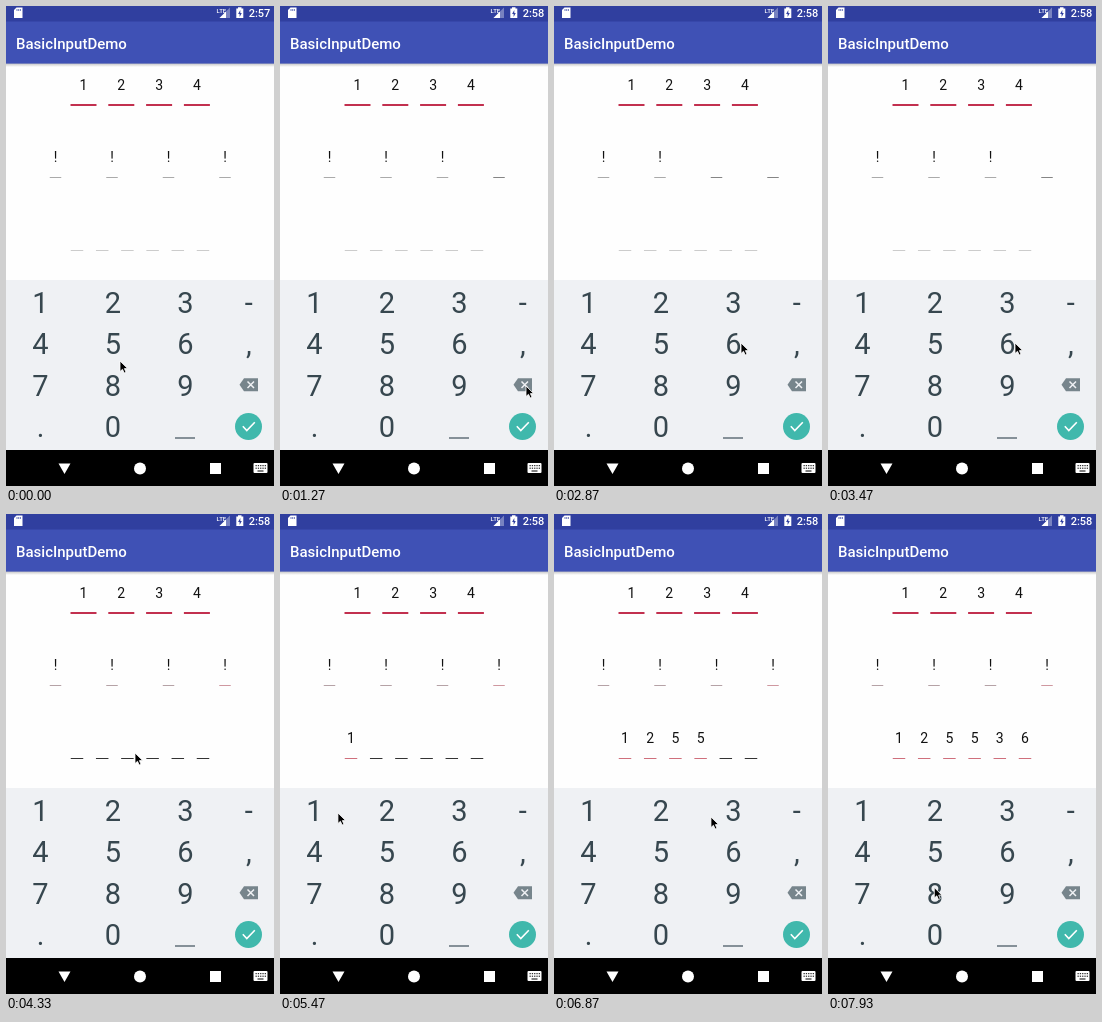
An HTML page that plays this animation: 268 px wide and 480 px high, repeating every 8 s.

```html
<!DOCTYPE html>
<html lang="en">
<head>
<meta charset="utf-8">
<title>PIN entry demo</title>
<style>
html, body { margin: 0; width: 100%; height: 100%; overflow: hidden; background: #fefefe; }
svg { display: block; }
text { font-family: Roboto, sans-serif; }
.entry text { font-size: 14px; text-anchor: middle; fill: #111; }
#keys text { font-size: 29px; text-anchor: middle; fill: #37474f; }
</style>
</head>
<body>
<svg width="268" height="480" viewBox="0 0 268 480">
  <defs>
    <linearGradient id="shade" x2="0" y2="1">
      <stop stop-color="#000" stop-opacity=".25"/>
      <stop offset="1" stop-color="#000" stop-opacity="0"/>
    </linearGradient>
  </defs>
  <rect width="268" height="480" fill="#fefefe"/>
  <rect y="57" width="268" height="4" fill="url(#shade)"/>
  <rect width="268" height="57.600" fill="#3f51b5"/>
  <rect width="268" height="15.500" fill="#303f9f"/>
  <text x="10" y="42.500" font-size="15" font-weight="500" fill="#fff">BasicInputDemo</text>

  <!-- status bar -->
  <g fill="#fff">
    <path d="M10.500 1.500H16.500v10.500H8V4z"/>
    <path d="M11 3v2M12.700 3v2M14.400 3v2" stroke="#303f9f" stroke-width=".7"/>
    <text x="210.500" y="6.500" font-size="6" font-weight="500">LTE</text>
    <path d="M224 1.500V12H213.500z" opacity=".35"/>
    <path d="M220 5.500V12H213.500z"/>
    <path d="M232 2.500V1.300h3.500v1.200h1.800V12h-7V2.500z"/>
    <path d="M234.300 4l-2.200 4h1.500v3l2.200-4h-1.500z" fill="#303f9f"/>
    <text id="clock" x="242.700" y="11" font-size="11" font-weight="500"></text>
  </g>

  <g class="entry" id="entry"></g>

  <!-- keyboard -->
  <rect y="274" width="268" height="170" fill="#eff1f4"/>
  <g id="keys"></g>
  <path d="M169 432h20" stroke="#62717a" stroke-width="1.500"/>
  <path d="M233.500 378.800l4.500-6.500h14v13h-14z" fill="#77858c"/>
  <path d="M241.500 375.500l6.500 6.500m0-6.500l-6.500 6.500" stroke="#eff1f4" stroke-width="1.500"/>
  <circle cx="242.500" cy="420.500" r="13.500" fill="#40b8ac"/>
  <path d="M236.800 420.300l4 4.200 8-8.300" fill="none" stroke="#fff" stroke-width="1.600"/>

  <!-- navigation bar -->
  <rect y="444" width="268" height="36"/>
  <g fill="#fff">
    <path d="M52.500 457.500h12l-6 10.500z"/>
    <circle cx="134" cy="462.500" r="6"/>
    <rect x="204" y="457" width="11" height="11"/>
    <rect x="247.500" y="457" width="14" height="10" rx="1"/>
    <path d="M249.500 459.700h10.500M249.500 462.200h10.500" stroke="#000" stroke-dasharray="1.300 1"/>
    <path d="M251.500 465h6" stroke="#000"/>
  </g>

  <path id="cursor" d="M0 0V10.500L2.500 8.300 4.200 12 6 11.200 4.400 7.600H7.700Z" fill="#000" stroke="#fff" stroke-width=".8"/>
</svg>
<script>
const LOOP = 8000, STEP = 1000 / 15;
const $ = id => document.getElementById(id);

function add(parent, tag, attrs, label = '') {
  const el = document.createElementNS('http://www.w3.org/2000/svg', tag);
  for (const name in attrs) el.setAttribute(name, attrs[name]);
  el.textContent = label;
  return parent.appendChild(el);
}

const columns = [34.5, 107, 179.5, 242.8];
['123-', '456,', '789', '.0'].forEach((row, r) =>
  [...row].forEach((key, c) => add($('keys'), 'text', { x: columns[c], y: 306.5 + r * 41.5 }, key)));

// One underlined cell per character
function makeRow(chars, x, gap, baseline, width, weight) {
  return [...chars].map((char, i) => {
    const cx = x + i * gap;
    return {
      text: add($('entry'), 'text', { x: cx, y: baseline }, char),
      line: add($('entry'), 'rect', {
        x: cx - width / 2, y: baseline + 16 - weight, width, height: weight, fill: '#c2304f'
      })
    };
  });
}
makeRow('1234', 77.5, 37.8, 84, 26, 2);
const marks = makeRow('!!!!', 49.5, 56.5, 156, 11.5, 1);
const code = makeRow('125536', 71, 25.2, 229, 12.5, 1);

// Cursor stops: time, x, y
const path = [
  [0, 114, 355], [70, 114, 355], [800, 246, 380], [1930, 246, 380],
  [2600, 187, 337], [3600, 187, 337], [4200, 129, 239], [4600, 129, 239],
  [5200, 40, 297], [5400, 45, 298], [5467, 58, 299], [5670, 105, 301],
  [5870, 105, 301], [6130, 109, 346], [6470, 109, 346], [6670, 129, 309],
  [6867, 157, 303], [6933, 190, 300], [7130, 190, 300], [7370, 187, 342],
  [7530, 187, 342], [7933, 100, 376], [LOOP, 98, 376]
];
const typed = [5270, 5670, 6200, 6400, 7130, 7470];

function cursorAt(t) {
  const i = path.findIndex(stop => stop[0] > t);
  const [t0, x0, y0] = path[i - 1], [t1, x1, y1] = path[i];
  const p = (t - t0) / (t1 - t0), k = t1 - t0 > 300 ? p * p * (3 - 2 * p) : p;
  return [x0 + (x1 - x0) * k, y0 + (y1 - y0) * k];
}

function paint(cells, count, filled, empty) {
  cells.forEach(({ text, line }, i) => {
    text.setAttribute('visibility', i < count ? 'visible' : 'hidden');
    line.setAttribute('fill', i < count ? filled(i) : empty);
  });
}

function draw(now) {
  const t = Math.floor((now % LOOP) / STEP + .01) * STEP;
  $('clock').textContent = t < 400 ? '2:57' : '2:58';
  const left = t < 1130 ? 4 : t < 1470 ? 3 : t < 3060 ? 2 : t < 3530 ? 3 : 4;
  paint(marks, left, i => t < 3530 ? '#aaa' : i < 3 ? '#b5a2a6' : '#cf98a0', '#858585');
  paint(code, typed.filter(time => time <= t).length, () => '#cf6f7c', t < 4200 ? '#ccc' : '#333');
  $('cursor').setAttribute('transform', `translate(${cursorAt(t)})`);
}

const start = performance.now();
function tick() {
  draw(performance.now() - start);
  requestAnimationFrame(tick);
}
tick();
</script>
</body>
</html>
```
